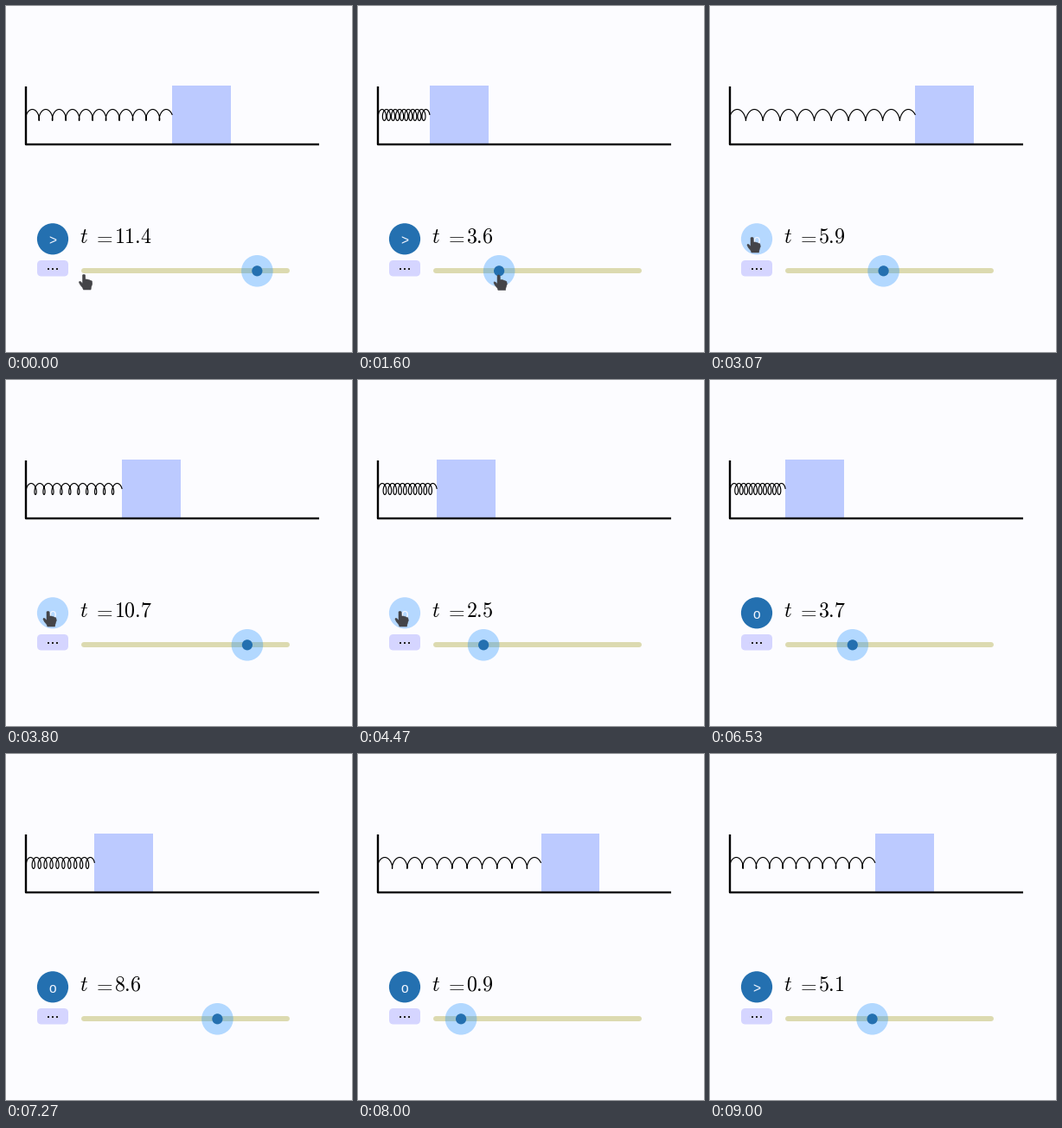
A matplotlib script for the animation above (9540 ms loop, 400 by 400 pixels).

```python
import numpy as np
import matplotlib.pyplot as plt
from matplotlib.animation import FuncAnimation
from matplotlib.patches import Circle, FancyBboxPatch, Polygon, Rectangle

plt.rcParams["mathtext.fontset"] = "cm"

SIZE, DPI = 400, 100
PX = 72 / DPI                      # points per pixel
LOOP, INTERVAL, STEP = 9540, 30, 1000 / 15
LAST_CHANGE = 9000

PAPER, INK = "#fcfcff", "#000000"
BLUE, SKY, LILAC = "#2470b0", "#b5d8ff", "#d5d5ff"
BLOCK, SAND, HAND = "#bccaff", "#dcdab0", "#444448"

UNIT = 84.7                        # pixels per unit of length
WALL_X, FLOOR_Y, SPRING_Y = 23.4, 159.7, 126
BLOCK_SIZE = 0.8 * UNIT
COILS, COIL_RX, COIL_RY = 10, 3.2, 6.5
BUTTON, KNOB_Y = (54, 269.3), 306.3
LAP = 4 * np.pi
PLAY, PAUSE = 2870, 8632

# Slider value over time: drag, then playback counted through several laps
VALUE_MS = [730, 1600, 1730, 2130, 2930, 3067, 4467, 6533, 8000, PAUSE]
VALUE = [11.4, 3.6, 3.2, 5.1, 5.1, 5.9,
         2.5 + LAP, 3.7 + 2 * LAP, 0.9 + 3 * LAP, 5.1 + 3 * LAP]

# Pointer moves: start ms, end ms, from, to
MOVES = [
    (0, 530, (90, 310), (290, 310.5)),
    (2200, 2730, (187, 311), (48.5, 267)),
    (4870, 5270, (48.5, 267), (27, 266)),
    (8130, 8530, (10.5, 309), (48.5, 267)),
    (8800, 8940, (48.5, 267), (30, 309)),
]
HIDDEN = [(5300, 8100), (8980, LOOP)]


def value_at(ms):
    return np.interp(ms, VALUE_MS, VALUE) % LAP


def knob_x(value):
    return 104.4 + 16.31 * value


def pointer_at(ms):
    if any(a <= ms < b for a, b in HIDDEN):
        return None
    if 700 <= ms < 2200:           # dragging the knob
        return np.array([knob_x(value_at(ms)) - 0.6, 310.5])
    start, end, p, q = [m for m in MOVES if m[0] <= ms][-1]
    s = np.clip((ms - start) / (end - start), 0, 1)
    s = s * s * (3 - 2 * s)
    return np.array(p) + s * (np.array(q) - np.array(p))


def spring(right):
    end = (2 * COILS + 1) * np.pi
    a = np.linspace(0, end, 900)
    drift = (right - WALL_X - 2 * COIL_RX) * a / end
    return (WALL_X + COIL_RX * (1 - np.cos(a)) + drift,
            SPRING_Y - COIL_RY * np.sin(a))


fig = plt.figure(figsize=(SIZE / DPI, SIZE / DPI), dpi=DPI, facecolor=PAPER)
ax = fig.add_axes([0, 0, 1, 1])
ax.set_xlim(0, SIZE)
ax.set_ylim(SIZE, 0)
ax.axis("off")


def add(patch, z):
    patch.set_zorder(z)
    return ax.add_patch(patch)


def line(xs, ys, width, color=INK, z=3, cap="projecting"):
    return ax.plot(xs, ys, color=color, lw=width * PX, zorder=z,
                   solid_capstyle=cap, solid_joinstyle="round")[0]


def label(x, y, text, size, **kw):
    return ax.text(x, y, text, fontsize=size * PX, va="baseline", zorder=6, **kw)


# Mass on a spring
block = add(Rectangle((0, FLOOR_Y - BLOCK_SIZE), BLOCK_SIZE, BLOCK_SIZE,
                      fc=BLOCK, lw=0), 1)
coil = line([], [], 1.15, z=2, cap="butt")
line([WALL_X, WALL_X, WALL_X + 4 * UNIT],
     [FLOOR_Y - BLOCK_SIZE + 0.8, FLOOR_Y, FLOOR_Y], 2.4, cap="butt")

# Play button and menu
button = add(Circle(BUTTON, 18.1, lw=0), 4)
symbol = label(BUTTON[0], 276, ">", 15.5, color="#f2f6ff", ha="center",
               family="Liberation Sans")
add(FancyBboxPatch((41, 299), 26, 8.5, boxstyle="round,pad=5",
                   fc=LILAC, lw=0), 4)
for x in (49.3, 54, 58.7):
    add(Rectangle((x - 1, 303), 2, 2, fc="#222222", lw=0), 5)

# Readout
label(84.6, 274, "$t$", 24, color=INK)
label(100, 274, "$=$", 24, color=INK)
readout = label(125.3, 274, "", 24, color=INK)

# Slider
line([90, 325], [KNOB_Y, KNOB_Y], 6, SAND, 4, "round")
halo = add(Circle((0, KNOB_Y), 18.3, fc="#1e90ff", alpha=0.33, lw=0), 5)
knob = add(Circle((0, KNOB_Y), 6.1, fc=BLUE, lw=0), 6)

# Pointing hand, relative to its fingertip
HAND_SHAPE = np.array([
    (-1.5, 1), (0, 0.3), (1.6, 1), (1.9, 6), (4, 6), (6.5, 6.8), (9.3, 8),
    (9.8, 11), (8.5, 15), (8, 18), (-0.5, 18), (-1.5, 15.5), (-4, 12.5),
    (-5.6, 9.5), (-5, 8.3), (-3.5, 8.8), (-1.5, 11)])
hand = add(Polygon(HAND_SHAPE, fc=HAND, ec=HAND, lw=0.5 * PX,
                   joinstyle="round"), 8)


def draw(i):
    ms = min(int((i * INTERVAL + 25) / STEP) * STEP, LAST_CHANGE)
    value = value_at(ms)

    left = WALL_X + UNIT * (1.6 + np.cos(value))
    block.set_x(left)
    coil.set_data(*spring(left))

    halo.center = knob.center = (knob_x(value), KNOB_Y)
    readout.set_text(f"${value:.1f}$")
    symbol.set_text("o" if PLAY <= ms < PAUSE else ">")

    tip = pointer_at(ms)
    hand.set_visible(tip is not None)
    hover = False
    if tip is not None:
        hand.set_xy(HAND_SHAPE + tip)
        hover = np.hypot(*(tip - BUTTON)) < 18
    button.set_facecolor(SKY if hover else BLUE)
    return block, coil, halo, knob, readout, symbol, hand, button


anim = FuncAnimation(fig, draw, frames=LOOP // INTERVAL, interval=INTERVAL,
                     repeat=True, repeat_delay=0, blit=False)
plt.show()
```
